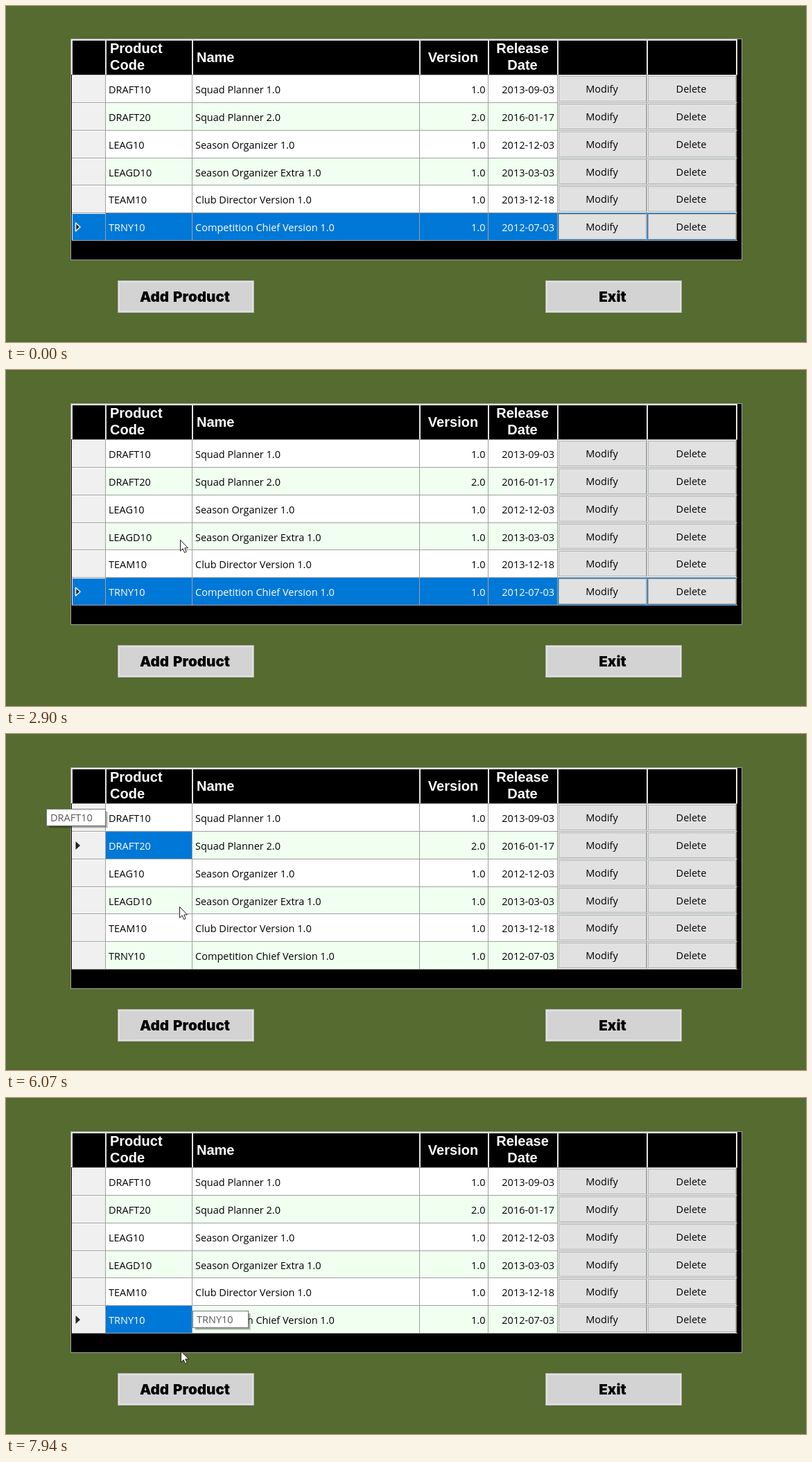
An HTML page for the animation above (7.99 s loop, 1154x485 px).

```html
<!DOCTYPE html>
<html lang="en">
<head>
<meta charset="utf-8">
<title>Product table</title>
<style>
  html, body { margin: 0; width: 100%; height: 100%; overflow: hidden; background: #556b2f; }
  svg { display: block; width: 1154px; height: 485px; }
  text { white-space: pre; }
  .cell { font: 14.5px "Open Sans", "Noto Sans", sans-serif; }
  .head { font: bold 20px "Liberation Sans", Arial, sans-serif; fill: #fff; }
  .big { font: 900 20.6px Inter, "Open Sans", sans-serif; word-spacing: 2px; }
</style>
</head>
<body>
<svg id="stage" viewBox="0 0 1154 485"></svg>
<script>
const LOOP = 7990, STEP = 50, SHIFT_AT = 2900;
const BLUE = '#0078d7', LINE = '#a0a0a0', LIGHT = '#e3e3e3';
const ROWS = [
  ['DRAFT10', 'Squad Planner 1.0', '1.0', '2013-09-03'],
  ['DRAFT20', 'Squad Planner 2.0', '2.0', '2016-01-17'],
  ['LEAG10', 'Season Organizer 1.0', '1.0', '2012-12-03'],
  ['LEAGD10', 'Season Organizer Extra 1.0', '1.0', '2013-03-03'],
  ['TEAM10', 'Club Director Version 1.0', '1.0', '2013-12-18'],
  ['TRNY10', 'Competition Chief Version 1.0', '1.0', '2012-07-03']
];
const COLS = [143, 268, 596, 695, 795, 924, 1053];
const edge = i => Math.floor(99.7 + 39.8 * i);

// The click on the fourth row, then one arrow key each
const PICKS = [4170, 4970, 5220, 5470, 6070, 6370, 6520, 6720, 6870];

// Pointer moves: start, end and the place reached
const MOVES = [
  { from: 280, to: 1030, x: 280, y: 420 },
  { from: 1740, to: 2190, x: 251, y: 245 },
  { from: 3770, to: 4170, x: 250, y: 249 },
  { from: 7740, to: 7940, x: 252, y: 365 }
];

const stage = document.getElementById('stage');

function add(parent, tag, attrs, content) {
  const el = document.createElementNS('http://www.w3.org/2000/svg', tag);
  for (const k in attrs) el.setAttribute(k, attrs[k]);
  if (content) el.textContent = content;
  parent.appendChild(el);
  return el;
}
const box = (parent, x, y, width, height, fill) =>
  add(parent, 'rect', { x, y, width, height, fill, 'shape-rendering': 'crispEdges' });
const label = (parent, kind, x, y, content, anchor = 'start') =>
  add(parent, 'text', { class: kind, x, y, 'text-anchor': anchor }, content);
const show = (el, on) => el.setAttribute('visibility', on ? 'visible' : 'hidden');

function frame(parent, x, y, w, h, border, fill) {
  box(parent, x, y, w, h, border);
  box(parent, x + 1, y + 1, w - 2, h - 2, fill);
}

function buildHeader(g) {
  box(g, 94, 48, 961, 2, LIGHT);
  box(g, 94, 48, 2, 51, LIGHT);
  for (const x of COLS) box(g, x, 50, 2, 49, LIGHT);
  label(g, 'head', 150, 68, 'Product');
  label(g, 'head', 150, 92, 'Code');
  label(g, 'head', 275, 81, 'Name');
  label(g, 'head', 645, 81, 'Version', 'middle');
  label(g, 'head', 745, 68, 'Release', 'middle');
  label(g, 'head', 745, 92, 'Date', 'middle');
  box(g, 95, edge(0), 960, 1, LINE);
}

function buildRow(g, data, i) {
  const top = edge(i) + 1, bottom = edge(i + 1), h = bottom - top, base = top + 26;
  box(g, 95, top, 48, h, '#f0f0f0');
  box(g, 144, top, 910, h, i % 2 ? '#f0fff0' : '#fff');
  const whole = box(g, 96, top, 958, h, BLUE);
  const single = box(g, 144, top, 124, h, BLUE);
  box(g, 95, top, 48, 1, '#fff');
  box(g, 95, top, 1, h, '#fff');
  for (const x of COLS) box(g, x, top, 1, h, LINE);
  box(g, 95, bottom, 960, 1, LINE);
  ['Modify', 'Delete'].forEach((name, k) => {
    const x = COLS[4 + k] + 2;
    frame(g, x, top + 1, 127, h - 2, '#adadad', '#e1e1e1');
    label(g, 'cell', x + 62.5, base - 1, name, 'middle');
  });
  const texts = [
    label(g, 'cell', 148, base, data[0]),
    label(g, 'cell', 273, base, data[1]),
    label(g, 'cell', 691.5, base, data[2], 'end'),
    label(g, 'cell', 791, base, data[3], 'end')
  ];
  const arrow = add(g, 'path', {
    d: `M100.5 ${top + 14}l6.5 6l-6.5 6z`, fill: '#222',
    'stroke-width': 1.6, 'stroke-linejoin': 'round'
  });
  return { whole, single, texts, arrow };
}

function buildButton(g, x, name) {
  const border = box(g, x, 396, 197, 47, '#adadad');
  const ring = box(g, x + 1, 397, 195, 45, '#e1e1e1');
  box(g, x + 3, 399, 191, 41, '#d3d3d3');
  label(g, 'big', x + 97, 427, name, 'middle');
  return { border, ring };
}

function buildTip(x, y, w, name) {
  const g = add(stage, 'g');
  for (let i = 0; i < 3; i++)
    box(g, x + 4, y + 4, w - 1 - i, 24 - i, '#000').setAttribute('opacity', 0.15);
  frame(g, x, y, w, 25, '#767676', '#fff');
  label(g, 'cell', x + 6, y + 18, name).setAttribute('fill', '#575757');
  return g;
}

const form = add(stage, 'g');
frame(form, 93, 47, 969, 320, LINE, '#000');
buildHeader(form);
const rows = ROWS.map((data, i) => buildRow(form, data, i));
const addButton = buildButton(form, 161, 'Add Product');
buildButton(form, 778, 'Exit');

const tipTop = buildTip(58, 108, 86, 'DRAFT10');
const tipLast = buildTip(269, 307, 81, 'TRNY10');
const glow = add(stage, 'circle', { cx: 251, cy: 249, r: 15, fill: '#ff0' });
const pointer = add(stage, 'path', {
  d: 'M.5 .5V16.3L4.1 12.9L6.6 18.6L9.2 17.5L6.8 11.9H11.5Z',
  fill: '#fff', stroke: '#1c1c1c', 'stroke-linejoin': 'round'
});

const clamp = v => Math.max(0, Math.min(1, v));

// Progress from 0 to 1, advancing once per screen step
const progress = (t, from, to) =>
  clamp(Math.floor((t - from) / STEP) * STEP / (to - from));

function pointerAt(t) {
  let x = 735, y = 475;
  for (const m of MOVES) {
    const p = progress(t, m.from, m.to), ease = Math.sin(p * Math.PI / 2);
    x += (m.x - x) * ease;
    y += (m.y - y) * ease;
  }
  return [Math.round(x), Math.round(y)];
}

function select(t) {
  const count = PICKS.filter(time => t >= time).length;
  const pick = Math.abs(4 - count);   // up to the first row, then down
  rows.forEach((row, i) => {
    const whole = !count && i === ROWS.length - 1;
    const single = count > 0 && i === pick;
    show(row.whole, whole);
    show(row.single, single);
    show(row.arrow, whole || single);
    row.arrow.setAttribute('stroke', whole ? '#f0f0f0' : 'none');
    row.texts.forEach((el, c) =>
      el.setAttribute('fill', whole || (single && c === 0) ? '#fff' : '#000'));
  });
}

function render(t) {
  form.setAttribute('transform', `translate(0 ${t >= SHIFT_AT ? 1 : 0})`);
  select(t);

  const [x, y] = pointerAt(t);
  show(pointer, t >= MOVES[0].from);
  pointer.setAttribute('transform', `translate(${x} ${y})`);

  const hover = x >= 161 && x < 358 && y >= 396 && y < 443;
  addButton.border.setAttribute('fill', hover ? BLUE : '#adadad');
  addButton.ring.setAttribute('fill', hover ? '#e5f1fb' : '#e1e1e1');

  glow.setAttribute('opacity',
    0.6 * progress(t, 3970, 4070) * (1 - progress(t, 4170, 4320)));
  tipTop.setAttribute('opacity', t < 5970 ? 0 : 1 - progress(t, 6120, 6320));
  show(tipLast, t >= 7380);
}

function tick() {
  render(performance.now() % LOOP);
  requestAnimationFrame(tick);
}
tick();
</script>
</body>
</html>
```
